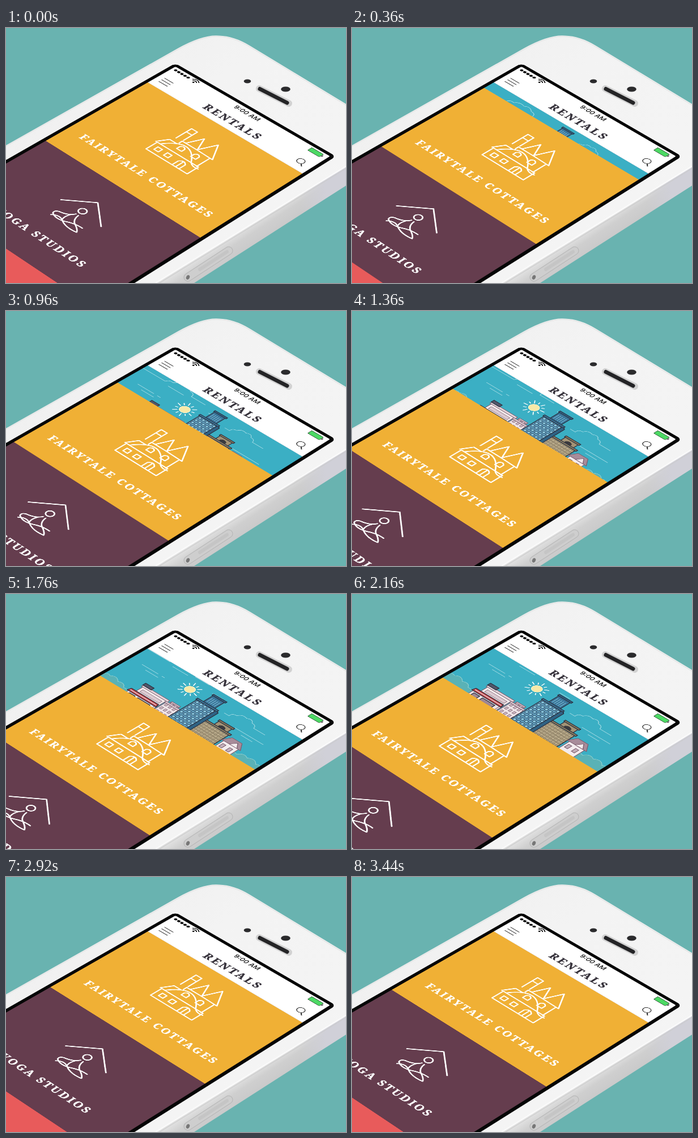
An HTML page that plays this animation: 600x450 px, repeating every 3480 ms.

```html
<!DOCTYPE html>
<html lang="en">
<head>
<meta charset="utf-8">
<title>Rentals pull to refresh</title>
<style>
@property --s { syntax: "<number>"; inherits: true; initial-value: 0; }
html, body { margin: 0; width: 100%; height: 100%; overflow: hidden; background: #69b3b0; }
.stage { position: absolute; left: 0; top: 0; width: 600px; height: 450px; overflow: hidden; }
.phone { position: absolute; left: 0; top: 0; }
/* screen units: 320 wide, origin at the lower left corner of the header */
.plane {
  position: absolute; left: 0; top: 0; width: 0; height: 0; transform-origin: 0 0;
  transform: matrix3d(.780727,.467549,0,-.00013843, -.805507,.430035,0,-.00012923, 0,0,1,0, 250,96,0,1);
}
.screen { position: absolute; left: -20px; top: -84px; animation: pull 3480ms infinite; }
.screen g { transform-origin: 0 0; }
/* --s: 0 at rest, 1 fully pulled */
@keyframes pull {
  0% { --s: 0; animation-timing-function: linear; }
  1.4% { --s: 0; animation-timing-function: cubic-bezier(.35,.5,.45,1); }
  75.86% { --s: 1; animation-timing-function: cubic-bezier(.4,.23,.6,1); }
  81.9% { --s: -.12; animation-timing-function: ease-in-out; }
  87.36%, 100% { --s: 0; }
}
.list { transform: translateY(calc(var(--s) * 117px)); }
.sky { transform: translateY(calc(28px - var(--s) * 30px)); }
.sun { transform: translate(119px, calc(63px - var(--s) * 35px)) rotate(calc(var(--s) * 180deg)); }
.town { transform: translate(160px, -30px) scale(calc(.8 + .2 * var(--s))) translate(-160px, 30px); }
.line { fill: none; stroke: #fff; stroke-width: 2.3; stroke-linecap: round; stroke-linejoin: round; }
.air { fill: none; stroke: #a5dbe4; stroke-width: 1; stroke-linecap: round; }
.ink { stroke: #2d3443; stroke-width: 1.5; stroke-linejoin: round; }
.mauve { stroke: #7d5f70; stroke-width: 1.2; stroke-linejoin: round; }
.name { font: 700 18.7px "Noto Serif", serif; letter-spacing: 3.2px; text-anchor: middle; fill: #fff; stroke: #fff; stroke-width: .4; }
.title { font-size: 19.6px; letter-spacing: 3.4px; fill: #38343d; stroke: #38343d; }
.time { font: 500 12.3px Inter, "Liberation Sans", sans-serif; text-anchor: middle; fill: #151515; }
</style>
</head>
<body>
<div class="stage">
  <svg class="phone" width="600" height="450" viewBox="0 0 600 450">
    <defs>
      <linearGradient id="side" gradientUnits="userSpaceOnUse" x1="430" y1="349" x2="455" y2="387">
        <stop offset="0" stop-color="#dedede"/><stop offset=".3" stop-color="#cfcfcf"/><stop offset="1" stop-color="#c6c6c7"/>
      </linearGradient>
      <linearGradient id="end" gradientUnits="userSpaceOnUse" x1="520" y1="0" x2="565" y2="0">
        <stop offset="0" stop-color="#d0d0d8" stop-opacity="0"/><stop offset="1" stop-color="#d0d0d8"/>
      </linearGradient>
      <linearGradient id="face" x1="0" y1="0" x2="1" y2="1">
        <stop offset="0" stop-color="#ededed"/><stop offset=".4" stop-color="#f3f3f3"/><stop offset="1" stop-color="#f5f5f5"/>
      </linearGradient>
    </defs>
    <path d="M600 240 258 450H332L600 278Z" fill="url(#side)"/>
    <path d="M520 290 600 240V278L520 329Z" fill="url(#end)"/>
    <path d="M0 207 303 36Q348 11 376 13.500Q402 14 430 31L600 134V244L264 450H0Z" fill="url(#face)"/>
    <path d="M0 208.500 304 37.500Q348 13 376 15Q402 16 430 33L600 136" fill="none" stroke="#e6e6e6" stroke-width="1.500"/>
    <path d="M600 244 264 450" stroke="#fafafa" stroke-width="2.500"/>
    <path d="M600 248 271 450" stroke="#c9c9c9"/>
    <path d="M321 440 393 393" stroke="#b4b4b4" stroke-width="15" stroke-linecap="round"/>
    <path d="M321 440 393 393" stroke="#cecece" stroke-width="13" stroke-linecap="round"/>
    <path d="M342 426 390 395" stroke="#c5c5c5" stroke-width="6" stroke-linecap="round"/>
    <ellipse cx="321" cy="440" rx="3" ry="4" fill="#777" transform="rotate(25 321 440)"/>
    <ellipse cx="426" cy="94" rx="6.300" ry="3.400" fill="#2b2b2d"/>
    <ellipse cx="493.500" cy="108" rx="8.300" ry="4.600" fill="#2b2b2d"/>
    <path d="M447 107 499 133" stroke="#d2d2d2" stroke-width="12" stroke-linecap="round"/>
    <path d="M448 107.500 496 132" stroke="#242426" stroke-width="7" stroke-linecap="round"/>
  </svg>

  <div class="plane">
    <svg class="screen" width="360" height="710" viewBox="0 0 360 710">
      <defs>
        <pattern id="glass" width="8" height="9" x="145" y="44" patternUnits="userSpaceOnUse">
          <rect width="8" height="9" fill="#65a5c4"/><rect x="1.300" y="1.600" width="5.200" height="5.600" fill="#8ccae0" stroke="#2b4560" stroke-width="1.100"/>
        </pattern>
        <pattern id="tiles" width="6" height="6" x="185" y="74" patternUnits="userSpaceOnUse">
          <rect width="6" height="6" fill="#c9ba97"/><rect x="1" y="1" width="4" height="3.600" fill="#ab9c7c" stroke="#6d614f" stroke-width=".7"/>
        </pattern>
        <pattern id="panes" width="8" height="11" x="117" y="84" patternUnits="userSpaceOnUse">
          <rect width="8" height="11" fill="#efe5e8"/><rect x="2" y="2" width="4" height="6" fill="#cdb9c3" stroke="#7d5f70" stroke-width=".8"/>
        </pattern>
      </defs>
      <g transform="translate(20 84)">
        <rect width="320" height="240" fill="#3bafc4"/>
        <g class="sky">
          <path class="air" d="M0 0H48Q50 -8 59 -6Q64 -15 76 -11Q84 -18 93 -9Q103 -9 103 0H132M60 6H92"/>
          <path class="air" d="M24 37H58M66 37H72M38 44H64M150 12H170M232 52H288M250 59H272"/>
        </g>
        <g class="sun">
          <g id="rays" stroke="#fff" stroke-width="1.500" stroke-linecap="round"></g>
          <circle r="8.500" fill="#f8e9a8" stroke="#fff6d2"/>
        </g>
        <g class="town">
          <path class="air" d="M196 38H206Q205 29 214 29Q218 19 229 23Q238 17 243 26Q252 26 253 34H276"/>
          <path d="M-3 160V100Q2 94 8 98Q17 89 27 100Q38 94 44 105Q55 102 60 116V160Z" fill="#5ab2b6" stroke="#8fcfcf"/>
          <path d="M264 160V108Q268 97 279 102Q285 90 296 97Q307 88 315 99Q320 95 323 99V160Z" fill="#5ab2b6" stroke="#8fcfcf"/>

          <g class="mauve">
            <path d="M64 160V80H114V160Z" fill="#f3ebec"/>
            <path d="M61 77H117V82H61Z" fill="#e4d5da"/>
            <path d="M69 87H110V94H69Z" fill="#dccbd2" stroke-width=".8"/>
            <path d="M55 160V97H111V160Z" fill="#eee3e6"/>
            <path d="M116 160V84H121V78H139V84H145V160Z" fill="url(#panes)"/>
            <path d="M114 82H146V86H114ZM121 76H139V79H121Z" fill="#dccad2"/>
          </g>
          <path class="ink" d="M60 78V71H78V78Z" fill="#51566a"/>
          <path class="ink" d="M54 97H112L114 105H52Z" fill="#b93f45"/>
          <path d="M55 101H111" stroke="#f3e5e5" stroke-width="1.500"/>
          <path class="ink" d="M60 108H72V160H60ZM78 108H104V118H78Z" fill="#9d8795"/>

          <path class="ink" d="M205 160V59H232V160Z" fill="#a39375"/>
          <path class="ink" d="M203 56H234V60H203Z" fill="#857659"/>
          <path d="M212 72V67Q218 61 225 67V72Z" fill="#3b3a3d"/>
          <path class="ink" d="M185 160V74H239V160Z" fill="url(#tiles)"/>
          <path class="ink" d="M183 71H241V75H183Z" fill="#8c7c5f"/>

          <g class="mauve">
            <path d="M243 160V90H273V160Z" fill="#f3ecee"/>
            <path d="M239 91 247 76H267L277 91Z" fill="#a88c9a"/>
            <path d="M254 91 262 80 270 91Z" fill="#f2ebed"/>
            <path d="M247 97H253V107H247ZM261 97H267V107H261Z" fill="#c4b0ba"/>
          </g>

          <path class="ink" d="M154 44V17H178V44Z" fill="#39759a"/>
          <path d="M158 23V37M162 23V37M166 23V37M170 23V37M174 23V37" stroke="#7fbdd3" stroke-width="1.200"/>
          <path class="ink" d="M152 14H180V18H152Z" fill="#2f6284"/>
          <path class="ink" d="M183 160V40L190 46V160Z" fill="#2f6284"/>
          <path class="ink" d="M144 160V43H183V160Z" fill="url(#glass)"/>
          <path class="ink" d="M142 40H186V44H142Z" fill="#39759a"/>
        </g>

        <g class="list">
          <rect width="320" height="226.500" fill="#f0b035"/>
          <rect y="226" width="320" height="226.500" fill="#653d4e"/>
          <rect y="452" width="320" height="170" fill="#e85b5b"/>
          <g class="line">
            <path d="M130 74V39H142V70M130 51H142"/>
            <path d="M149 73 161 44 173 73M172 73 186 40 205 74Z"/>
            <path d="M142 73H173M200 76V104M142 73V80"/>
            <path d="M118 128V103H203V128Z"/>
            <path d="M115 103 126 84H140M124 103Q154 55 188 103Q196 110 206 107"/>
            <path d="M149 93V86Q154 79 159 86V93ZM177 92V84Q182 77 187 84V92Z"/>
            <path d="M127 111H136V120H127ZM147 111H156V120H147ZM172 128V114Q179 105 186 114V128M179 111V128"/>
          </g>
          <text class="name" x="163.500" y="183">FAIRYTALE COTTAGES</text>
          <g class="line">
            <path d="M119 312 161 277 204 314"/>
            <circle cx="160" cy="308" r="6.500"/>
            <path d="M158 320Q153 331 137 334Q130 337 133 343Q145 351 160 344Q174 336 188 337"/>
            <path d="M163 320Q164 331 172 337Q186 344 189 350Q170 354 156 346Q144 338 134 348"/>
            <path d="M154 326Q150 336 153 343"/>
          </g>
          <text class="name" x="161.500" y="403">YOGA STUDIOS</text>
        </g>

        <rect y="-64" width="320" height="64" fill="#fff"/>
        <path d="M0 -.4H320" stroke="#e4dfe6" stroke-width=".8"/>
        <path d="M7.500 -56.500H35" stroke="#111" stroke-width="5.600" stroke-linecap="round" stroke-dasharray="0 6.700"/>
        <g fill="none" stroke="#111" stroke-width="1.700">
          <path d="M41.500 -58.500Q48.500 -65 55.500 -58.500M44 -55.800Q48.500 -60 53 -55.800"/>
          <circle cx="48.500" cy="-53.300" r=".9"/>
        </g>
        <text class="time" x="161" y="-49.500">9:00 AM</text>
        <rect x="287" y="-60" width="23" height="9.500" rx="1.200" fill="#4cd964" stroke="#3a5b41" stroke-width=".9"/>
        <path d="M311.700 -57V-53.500" stroke="#333" stroke-width="1.600"/>
        <path d="M10 -28H29M10 -21.500H29M10 -15H29" stroke="#3a3a3a" stroke-width="1.300"/>
        <text class="name title" x="161.500" y="-13.500">RENTALS</text>
        <circle cx="298" cy="-22" r="6.300" fill="none" stroke="#333" stroke-width="1.200"/>
        <path d="M302.500 -17.500 307.500 -12.500" stroke="#333" stroke-width="1.800"/>
        <rect x="-3" y="-67" width="326" height="760" rx="5" fill="none" stroke="#060606" stroke-width="6.400"/>
      </g>
    </svg>
  </div>
</div>
<script>
const ray = i => `<path d="M0 -12V${i % 2 ? -16 : -18.5}" transform="rotate(${i * 30})"/>`;
document.getElementById("rays").innerHTML = Array.from({ length: 12 }, (_, i) => ray(i)).join("");
</script>
</body>
</html>
```
